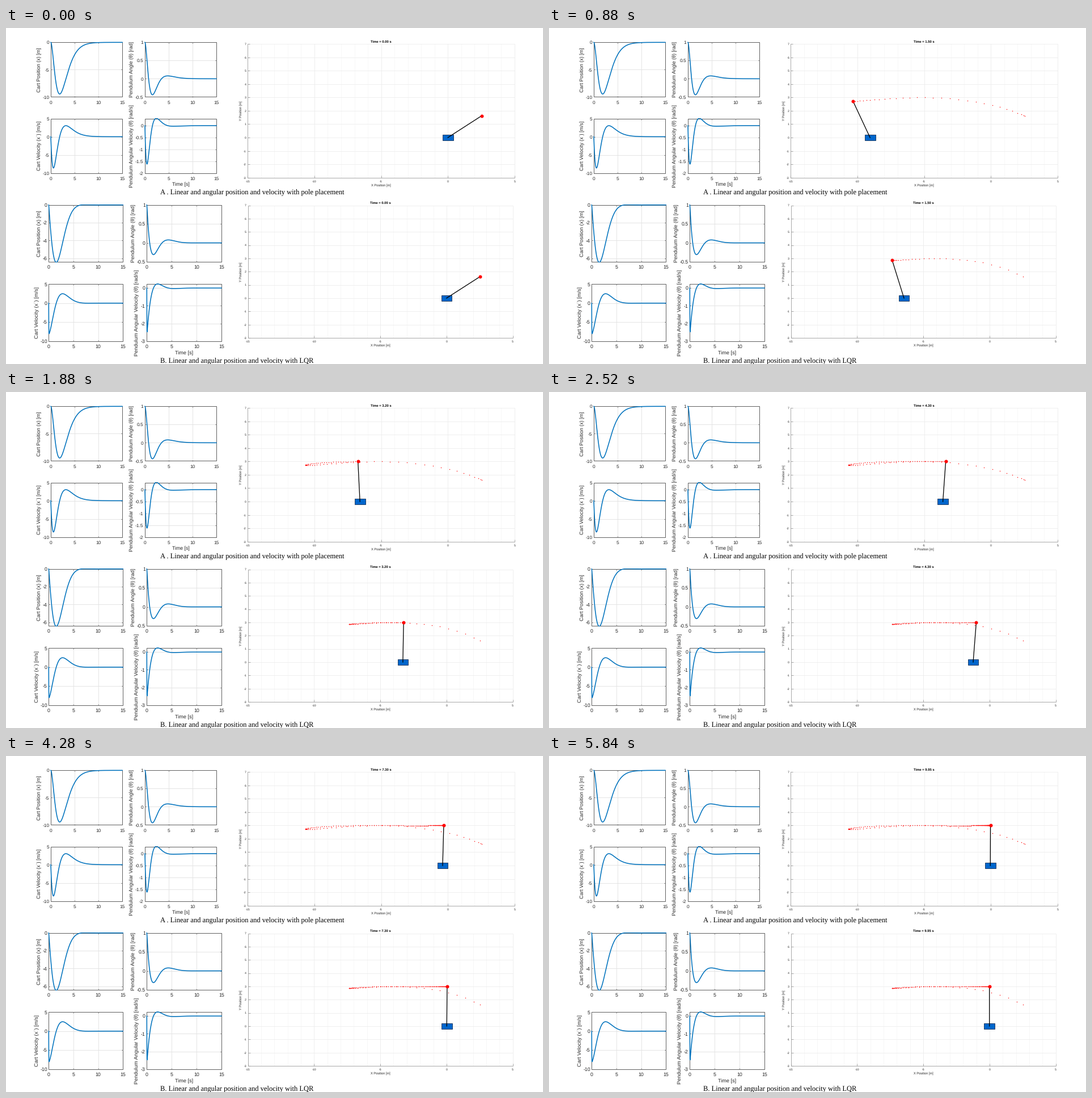
Write a matplotlib script that moves like this. It is 947 px wide and 592 px high and loops after 5880 ms.

```python
import numpy as np
import matplotlib.pyplot as plt
from matplotlib.animation import FuncAnimation
from matplotlib.collections import LineCollection
from matplotlib.patches import Rectangle

W, H, DPI = 947, 592, 100
PT = 72 / DPI                      # points per pixel
FRAMES, STEP, DT, SAMPLES = 147, 40, 0.05, 200
G, ROD = 10.0, 3.0
INK, EDGE, BLUE = "#262626", "#505050", "#0072BD"
SANS, SERIF = "Liberation Sans", "Liberation Serif"

plt.rcParams["text.hinting"] = "no_hinting"
plt.rcParams["axes.unicode_minus"] = False

fig = plt.figure(figsize=(W / DPI, H / DPI), dpi=DPI, facecolor="white")
ax = fig.add_axes([0, 0, 1, 1])
ax.set(xlim=(0, W), ylim=(H, 0))
ax.axis("off")


def cart_pole(poles, t):
    """Closed-loop response from a 1 rad tilt: x, v, angle, rate."""
    p = np.array(poles, complex)
    c = np.linalg.solve(np.vander(p, increasing=True).T, [-ROD, 0, -G, 0])

    def z(k):
        return (np.exp(np.outer(t, p)) @ (c * p**k)).real

    angle, rate = -z(2) / G, -z(3) / G
    return z(0) + ROD * angle, z(1) + ROD * rate, angle, rate


def label(x, y, s, size, ha="center", rot=0, font=SANS, color=INK, **kw):
    return ax.text(x, y, s, fontsize=size * PT, ha=ha, va="baseline", rotation=rot,
                   rotation_mode="anchor", family=font, color=color, **kw)


def segments(segs, color, width):
    ax.add_collection(LineCollection(segs, colors=color, linewidths=width * PT))


class Scale:
    """Maps data to stage pixels inside a box."""

    def __init__(self, box, xlim, ylim):
        self.x0, self.y0, self.x1, self.y1 = box
        self.xlim, self.ylim = xlim, ylim

    def x(self, v):
        a, b = self.xlim
        return self.x0 + (np.asarray(v) - a) / (b - a) * (self.x1 - self.x0)

    def y(self, v):
        a, b = self.ylim
        return self.y1 - (np.asarray(v) - a) / (b - a) * (self.y1 - self.y0)

    def vlines(self, vals):
        return [[(self.x(v), self.y0), (self.x(v), self.y1)] for v in vals]

    def hlines(self, vals):
        return [[(self.x0, self.y(v)), (self.x1, self.y(v))] for v in vals]


def small_plot(box, ylim, yticks, t, data, name, name_x, size):
    s = Scale(box, (0, 15), ylim)
    tick = size * 0.95
    inner = [v for v in yticks if ylim[0] < v < ylim[1]]
    segments(s.vlines([5, 10]) + s.hlines(inner), "#e2e2e2", 0.9)
    marks = []
    for v in (5, 10):
        marks += [[(s.x(v), s.y1), (s.x(v), s.y1 - 2)], [(s.x(v), s.y0), (s.x(v), s.y0 + 2)]]
    for v in inner:
        marks += [[(s.x0, s.y(v)), (s.x0 + 2, s.y(v))], [(s.x1, s.y(v)), (s.x1 - 2, s.y(v))]]
    segments(marks, EDGE, 0.8)
    ax.add_patch(Rectangle((s.x0, s.y0), s.x1 - s.x0, s.y1 - s.y0, fill=False,
                           ec=EDGE, lw=0.9 * PT))
    line, = ax.plot(s.x(t), s.y(data), color=BLUE, lw=1.55 * PT, zorder=3)
    line.set_clip_path(Rectangle((s.x0 - 1, s.y0 - 1), s.x1 - s.x0 + 2, s.y1 - s.y0 + 2,
                                 transform=ax.transData))
    for v in (0, 5, 10, 15):
        label(s.x(v), s.y1 + 12, f"{v}", tick)
    for v in yticks:
        label(s.x0 - 2.5, s.y(v) + 0.36 * tick, f"{v:g}", tick, ha="right")
    label(name_x, (s.y0 + s.y1) / 2, name, size, rot=90)


class Stage:
    """Cart, rod and traced path in the wide plot."""

    def __init__(self, box, poles, title_y):
        s = self.s = Scale(box, (-15, 5), (-3, 7))
        mid = (s.x0 + s.x1) / 2
        xs, ys = range(-15, 6, 5), range(-3, 8)
        segments(s.vlines(range(-14, 6)), "#f6f6f6", 0.8)
        segments(s.vlines([-10, -5, 0, 5]) + s.hlines(range(-2, 8)), "#ececec", 0.8)
        ticks = [[(s.x(v), s.y1), (s.x(v), s.y1 - 4)] for v in xs]
        ticks += [[(s.x0, s.y(v)), (s.x0 + 4, s.y(v))] for v in ys]
        segments(ticks + s.vlines([-15]) + s.hlines([-3]), "#959595", 0.8)
        for v in xs:
            label(s.x(v), s.y1 + 8, f"{v}", 5.3)
        for v in ys:
            label(s.x0 - 2.5, s.y(v) + 1.9, f"{v}", 5.3, ha="right")
        label(mid, s.y1 + 15, "X Position [m]", 5.7)
        label(416, (s.y0 + s.y1) / 2, "Y Position [m]", 5.7, rot=90)
        self.title = label(mid, title_y, "", 5.9, weight="bold", color="black")

        x, _, angle, _ = cart_pole(poles, np.arange(SAMPLES) * DT)
        self.cx, self.cy = s.x(x), s.y(0)
        self.bx, self.by = s.x(x + ROD * np.sin(angle)), s.y(ROD * np.cos(angle))
        self.w, self.h = s.x(0.8) - s.x(0), s.y(0) - s.y(0.4)
        self.trail, = ax.plot([], [], "o", color="red", ms=1.4 * PT, mew=0, zorder=4)
        self.cart = Rectangle((0, 0), self.w, self.h, fc="#0066CC", ec="#10284a",
                              lw=0.8 * PT, zorder=5)
        ax.add_patch(self.cart)
        self.rod, = ax.plot([], [], color="black", lw=1.3 * PT, zorder=6)
        self.bob, = ax.plot([], [], "o", color="red", ms=6 * PT, mew=0, zorder=7)

    def show(self, n):
        self.title.set_text(f"Time = {n * DT:.2f} s")
        self.trail.set_data(self.bx[:n + 1], self.by[:n + 1])
        self.cart.set_xy((self.cx[n] - self.w / 2, self.cy - self.h / 2))
        self.rod.set_data([self.cx[n], self.bx[n]], [self.cy, self.by[n]])
        self.bob.set_data([self.bx[n]], [self.by[n]])


PLACED = [-1, -1.1, -1.35, -1.5]
LQR = [-70, -0.804, -0.784 + 0.759j, -0.784 - 0.759j]
NAMES = ["Cart Position (x) [m]", "Cart Velocity (x˙) [m/s]",
         "Pendulum Angle (θ) [rad]", "Pendulum Angular Velocity (θ\u0307) [rad/s]"]
t = np.linspace(0, 15, 751)


def panel(poles, size, cols, rows, limits, ticks, name_x):
    data = cart_pole(poles, t)
    for i in range(4):
        (x0, x1), (y0, y1) = cols[i // 2], rows[i % 2]
        small_plot((x0, y0, x1, y1), limits[i], ticks[i], t, data[i],
                   NAMES[i], name_x[i], size)


panel(PLACED, 8.85, [(79, 205), (245, 371)], [(25.3, 121.5), (159.5, 255.5)],
      [(-10, 0), (-10, 5), (-0.5, 1), (-2, 0.3)],
      [(0, -5, -10), (5, 0, -5, -10), (1, 0.5, 0, -0.5), (0, -0.5, -1, -1.5, -2)],
      [61, 61, 224, 224])
panel(LQR, 9.25, [(75.3, 206.3), (248.3, 380)], [(311.7, 412), (451.3, 551.7)],
      [(-6.4, 0), (-10, 5), (-0.5, 1), (-3, 0.22)],
      [(0, -2, -4, -6), (5, 0, -5, -10), (1, 0.5, 0, -0.5), (0, -1, -2, -3)],
      [61, 57, 227.5, 233])

label(308.5, 278, "Time [s]", 8.8)
label(314, 575.5, "Time [s]", 9.1)
for y, s in ((292.5, "A . Linear and angular position and velocity with pole placement"),
             (589, "B. Linear and angular position and velocity with LQR")):
    label(272, y, s, 12.55, ha="left", font=SERIF, color="black")

stages = [Stage((426.3, 28, 896.8, 263.8), PLACED, 25.5),
          Stage((426.5, 312.5, 893.7, 546), LQR, 309.7)]


def update(k):
    n = round(k * (SAMPLES - 1) / (FRAMES - 1))
    for stage in stages:
        stage.show(n)
    return []


anim = FuncAnimation(fig, update, frames=FRAMES, interval=STEP, repeat=True,
                     repeat_delay=0, init_func=lambda: update(0))
plt.show()
```
